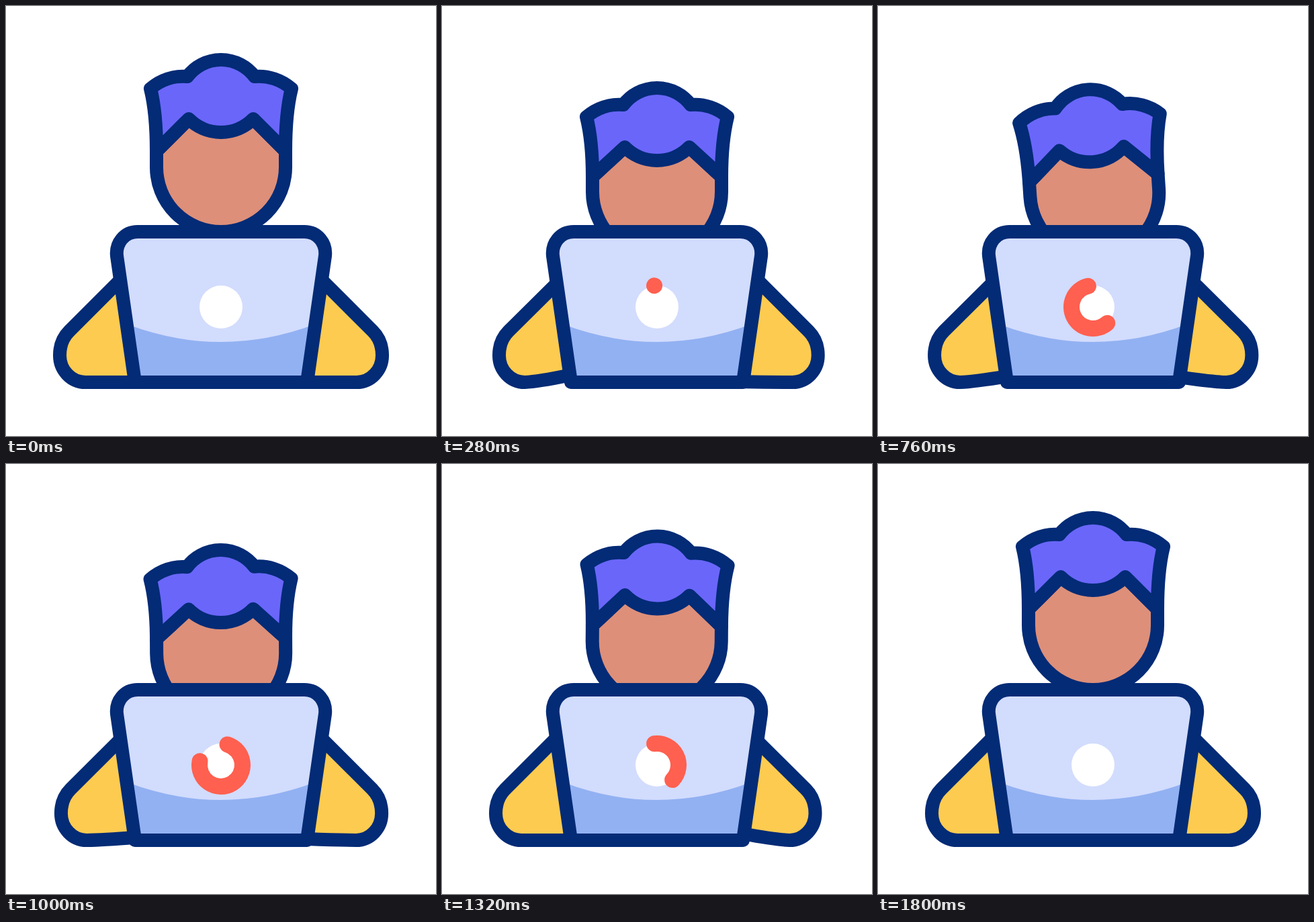
Recreate the animation shown at these times as an HTML page. Size 640 by 640 pixels, loop 2000 ms.

```html
<!DOCTYPE html>
<html lang="en">
<head>
<meta charset="utf-8">
<title>Working at a laptop</title>
<style>
  html, body { margin: 0; height: 100%; overflow: hidden; background: #fff; }
  svg { display: block; width: 100vw; height: 100vh; }
  .line { stroke: #032b76; stroke-width: 20; stroke-linejoin: round; stroke-linecap: round; }
</style>
</head>
<body>
<svg viewBox="0 0 640 640" fill="none">
  <g id="head">
    <path id="face" class="line" fill="#dd8f79"/>
    <path id="hair" class="line" fill="#6a66fa"/>
  </g>
  <path id="left" class="line" fill="#fdcb50"/>
  <path id="right" class="line" fill="#fdcb50" transform="matrix(-1 0 0 1 640 0)"/>
  <path id="lid" fill="#d2dcfd"/>
  <path fill="#92b1f2" d="M181 474Q320 526 459 474L448 560H192Z"/>
  <path id="rim" class="line"/>
  <circle cx="320" cy="448" r="32" fill="#fff"/>
  <path id="arc" stroke="#ff6050" stroke-width="24" stroke-linecap="round"/>
</svg>
<script>
const LOOP = 2000, STEP = 40;

const $ = id => document.getElementById(id);
const draw = (id, d) => $(id).setAttribute('d', d);

// Rises smoothly from 0 to 1 between two times.
function ease(t, start, end) {
  const s = Math.min(1, Math.max(0, (t - start) / (end - start)));
  return s * s * (3 - 2 * s);
}

// Sum of cosine bumps around the given times.
function taps(t, reach, ...peaks) {
  const bump = d => d < reach ? (1 + Math.cos(Math.PI * d / reach)) / 2 : 0;
  return peaks.reduce((sum, peak) => sum + bump(Math.abs(t - peak)), 0);
}

function drawHead(t) {
  const drop = 42 * ease(t, 50, 270) + 6 * ease(t, 600, 1000) - 48 * ease(t, 1130, 1550);
  const tilt = 4.2 * (2 * ease(t, 800, 1220) - ease(t, 600, 800) - ease(t, 1220, 1345));
  // Lower parts travel less than the top of the hair.
  const end = 216 - drop * .09, chin = 240 - drop * .13;
  $('head').setAttribute('transform', `translate(0 ${drop}) rotate(${tilt} 320 200)`);
  draw('face', `M224 ${end}V${chin}A96 96 0 0 0 416 ${chin}V${end}L368 168H272Z`);
  draw('hair', `M224 ${end}C224 180 221 147 215 123C230 110 250 103 270 105
    A62.5 62.5 0 0 1 370 105C390 103 410 110 425 123C419 147 416 180 416 ${end}
    L368 168A67.6 67.6 0 0 1 272 168Z`);
}

function drawArm(id, lift) {
  const x = n => n + 5 * lift;
  draw(id, `M${x(200)} ${378 + lift}L${x(94)} 484C${x(85)} 493 ${x(80)} 506 ${x(80)} 520
    C${x(80)} 542 ${x(97)} 560 ${x(118)} 560
    C${x(140)} ${560 - lift} 168 ${560 - 6 * lift} 192 ${560 - 11 * lift}Z`);
}

// Angles run anticlockwise from just left of the top.
function rimPoint(angle) {
  const a = (angle + 7) * Math.PI / 180;
  return `${320 - 32 * Math.sin(a)} ${448 - 32 * Math.cos(a)}`;
}

function drawSpinner(t) {
  const lead = 360 * ease(t, 270, 1138), tail = 360 * ease(t, 675, 1800);
  if (lead <= 0 || tail >= 360) return draw('arc', '');
  const to = a => `A32 32 0 0 0 ${rimPoint(a)}`;
  draw('arc', 'M' + rimPoint(tail) + to((tail + lead) / 2) + to(lead));
}

const laptop = 'M196 336H444C464 336 477 353 475 372L448 560H192L165 372C163 353 176 336 196 336Z';
draw('lid', laptop);
draw('rim', laptop);

function frame() {
  const t = Math.floor(performance.now() % LOOP / STEP) * STEP;
  drawHead(t);
  drawArm('left', taps(t, 210, 280, 700, 1120, 1540));
  drawArm('right', .9 * taps(t, 240, 480, 830, 1310, 1560));
  drawSpinner(t);
  requestAnimationFrame(frame);
}
frame();
</script>
</body>
</html>
```
